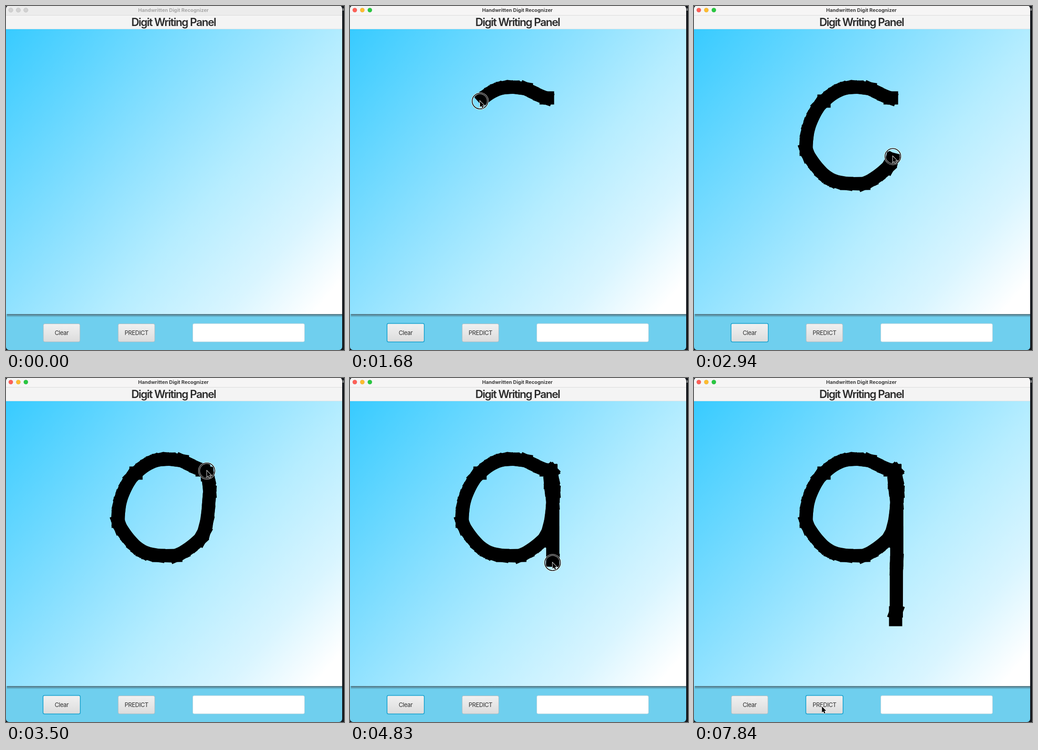
These frames come from a looping animation (741x756 px, 8 s). An HTML page with a canvas:

```html
<!DOCTYPE html>
<html lang="en">
<head>
<meta charset="utf-8">
<title>Digit panel</title>
<style>
  html, body { margin: 0; width: 741px; height: 756px; overflow: hidden; }
  canvas { display: block; }
</style>
</head>
<body>
<canvas id="stage" width="741" height="756"></canvas>
<script>
const c = document.getElementById('stage').getContext('2d');
const LOOP = 8000, STEP = 70, LAG = 28, PEN = 29;
const FONT = 'Inter, "Open Sans", sans-serif';

// Pen path: [start ms, end ms, x y pairs], constant speed within a leg
const legs = [
  [1260, 1680, '433 202 430 202 419 198 408 193 396 187 385 182 372 180 358 178.5 345 179 335 180 324 183 313 188 303 194 294 201 285 209'],
  [1680, 2380, '285 209 275 219 266 233 259 247 253 262 249 277 247 292 246 303 246 315 251 328 260 342 270 355 283 369 292 376 302 382 313 386 335 390'],
  [2380, 3500, '335 390 350 390.5 372 390 386 384 400 375 413 365 425 354 434 338 440 315 443 293 445 268 446.5 250 445.5 237 443.5 222 441 212 440.5 204'],
  [3500, 3780, '440.5 204 441.5 205.5 440 204'],
  [3780, 4830, '440 204 439.5 230 441 245 443.5 262 444.5 275.5 444.5 290 444.6 400 444.2 406'],
  [4830, 5880, '444.2 406 443.7 420 443.5 512 442 516 442 531'],
];

const path = legs.flatMap(([t0, t1, text]) => {
  const n = text.split(' ').map(Number), pts = [];
  let len = 0;
  for (let i = 0; i < n.length; i += 2) {
    if (i) len += Math.hypot(n[i] - n[i - 2], n[i + 1] - n[i - 1]);
    pts.push({ x: n[i], y: n[i + 1], len });
  }
  return pts.map(p => ({ x: p.x, y: p.y, t: t0 + (t1 - t0) * p.len / len }));
});

// Pointer moves outside the stroke
const arrive = [{ t: 70, x: 352, y: 800 }, { t: 140, x: 353, y: 726 }, { t: 280, x: 378, y: 400 },
  { t: 420, x: 397, y: 235 }, { t: 770, x: 397, y: 235 }, { t: 1050, x: 433, y: 202 }];
const leave = [{ t: 6510, x: 442, y: 531 }, { t: 6790, x: 362, y: 640 }, { t: 7070, x: 280.5, y: 722 }];
const track = [...arrive, ...path, ...leave];

function mix(a, b, t) {
  const k = b.t > a.t ? Math.min(1, Math.max(0, (t - a.t) / (b.t - a.t))) : 1;
  return { x: a.x + (b.x - a.x) * k, y: a.y + (b.y - a.y) * k };
}

function pointer(t) {
  const i = track.findIndex(p => p.t > t);
  return i < 0 ? track[track.length - 1] : mix(track[Math.max(0, i - 1)], track[i], t);
}

function rect(x, y, w, h, fill) {
  c.fillStyle = fill;
  c.fillRect(x, y, w, h);
}

function box(x, y, w, h, r, fill, line, width = 1) {
  c.beginPath();
  c.roundRect(x, y, w, h, r);
  c.fillStyle = fill;
  c.fill();
  c.strokeStyle = line;
  c.lineWidth = width;
  c.stroke();
}

function ramp(x0, y0, x1, y1, ...stops) {
  const g = c.createLinearGradient(x0, y0, x1, y1);
  stops.forEach(([at, color]) => g.addColorStop(at, color));
  return g;
}

function label(text, x, y, font, color, spacing) {
  c.font = `${font} ${FONT}`;
  c.letterSpacing = spacing + 'px';
  c.textAlign = 'center';
  c.fillStyle = color;
  c.fillText(text, x + spacing / 2, y);
}

function button(text, x, focused, pressed) {
  const top = pressed ? '#e2e2e2' : '#f1f1f1', low = pressed ? '#cfcfcf' : '#dcdcdc';
  const fill = ramp(0, 698, 0, 738, [0, top], [1, low]);
  if (focused) box(x - 0.3, 697.7, 81.6, 40.6, 3, fill, '#1fa5d0', 1.7);
  else box(x + 0.5, 698.5, 80, 39.5, 3, fill, '#b4bcc0');
  label(text, x + 40.7, 722.5, '13px', '#2f2f2f', -0.45);
}

function windowFrame(active) {
  rect(0, 0, 741, 756, '#15181d');
  label('a', 739, 10, '9px', '#c4c4c4', 0);
  c.save();
  c.beginPath();
  c.roundRect(0, -1, 737, 757, 7);
  c.clip();
  rect(0, 0, 737, 21, active ? '#f6f5f5' : '#ececec');
  rect(0, 20, 737, 1, '#dadada');
  rect(0, 21, 737, 30, '#f4f4f4');
  rect(0, 50, 737, 1, '#dfe3e5');
  rect(0, 51, 737, 626, ramp(0, 51, 737, 677, [0, '#38cbff'], [0.42, '#91e2ff'],
    [0.6, '#b6edff'], [0.8, '#d9f5ff'], [0.95, '#ffffff']));
  rect(0, 677, 737, 79, '#6fcfee');
  rect(2, 677, 735, 7, ramp(0, 677, 0, 684, [0, '#48565cd0'], [0.5, '#48606a70'], [1, '#48606a00']));
  c.restore();

  ['#ff5f57', '#febc2e', '#28c840'].forEach((color, i) => {
    c.beginPath();
    c.arc(10.5 + 16.5 * i, 9, 4.8, 0, 7);
    c.fillStyle = active ? color : '#d1d1d1';
    c.fill();
    c.strokeStyle = active ? '#00000020' : '#bdbdbd';
    c.lineWidth = 0.7;
    c.stroke();
  });
  label('Handwritten Digit Recognizer', 367, 12.5, '700 10.8px', active ? '#3d3d3d' : '#a6a6a6', 0);
  label('Digit Writing Panel', 368, 44.3, '600 24px', '#2b2b2b', -1.5);
}

// Every segment has its own square caps, which gives the jagged rim
function ink(t) {
  c.strokeStyle = '#000';
  c.lineWidth = PEN;
  c.lineCap = 'square';
  for (let i = 1; i < path.length && path[i - 1].t < t; i++) {
    const a = path[i - 1], b = mix(a, path[i], t);
    c.beginPath();
    c.moveTo(a.x, a.y);
    c.lineTo(b.x, b.y);
    c.stroke();
  }
  c.lineCap = 'butt';
}

function ring({ x, y }) {
  [['#ffffffcc', 3.6], ['#000', 1.6]].forEach(([color, width]) => {
    c.beginPath();
    c.arc(x, y, 17.2, 0, 7);
    c.strokeStyle = color;
    c.lineWidth = width;
    c.stroke();
  });
}

const arrow = new Path2D('M0 0V13.2L3 10.5L5 15.2L7.3 14.2L5.3 9.6H9.4Z');

function cursor({ x, y }) {
  c.save();
  c.translate(x, y);
  c.lineWidth = 1.8;
  c.strokeStyle = '#fff';
  c.stroke(arrow);
  c.fillStyle = '#000';
  c.fill(arrow);
  c.restore();
}

function draw(t) {
  const active = t >= 700, clicked = t >= 7490;
  const clicking = t >= 7490 && t < 7840;
  const down = (t >= 700 && t < 840) || (t >= 1260 && t < 6090) || clicking;
  windowFrame(active);
  button('Clear', 81.5, active && !clicked, false);
  button('PREDICT', 245.5, clicked, clicking);
  box(409.5, 698, 245, 40, 3, '#fff', '#bcd3dc');
  ink(t - LAG);
  if (t < 140) return;
  const p = pointer(t);
  if (down) ring(p);
  cursor(p);
}

const start = performance.now();
function frame() {
  const t = (performance.now() - start) % LOOP;
  draw(Math.floor(t / STEP) * STEP);
  requestAnimationFrame(frame);
}
frame();
</script>
</body>
</html>
```
